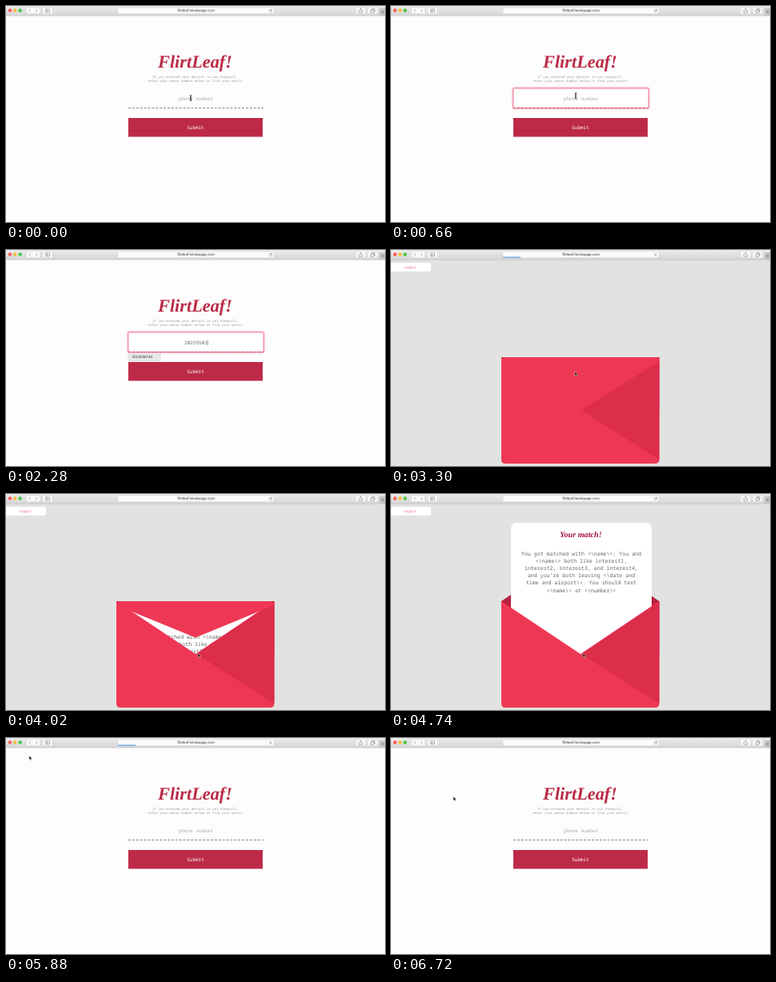
An HTML page for the animation above (6.78 s loop, 474 px wide and 270 px high).

```html
<!DOCTYPE html>
<html lang="en">
<head>
<meta charset="utf-8">
<title>Match finder</title>
<style>
  html, body { margin: 0; width: 100%; height: 100%; overflow: hidden; background: #fdfdfd; }
  svg { display: block; width: 100vw; height: 100vh; }
  text { text-anchor: middle; text-rendering: geometricPrecision; white-space: pre; }
  .mono { font-family: "Noto Sans Mono", "DejaVu Sans Mono", monospace; }
  .sans { font-family: Roboto, "Open Sans", sans-serif; }
  .script { font: italic bold 22.3px "Liberation Serif", "Noto Serif", serif; }
  .icon { fill: none; stroke: #777; stroke-width: .6; }
  .button { fill: #fbfbfb; stroke: #d0d0d0; stroke-width: .4; }
</style>
</head>
<body>
<svg viewBox="0 0 474 270">
  <defs>
    <linearGradient id="chrome" x2="0" y2="1">
      <stop stop-color="#ebebeb"/><stop offset="1" stop-color="#d6d6d6"/>
    </linearGradient>
    <clipPath id="inside"><path d="M0 0H474V262H0Z"/></clipPath>
    <filter id="glow" x="-10%" y="-30%" width="120%" height="160%"><feGaussianBlur stdDeviation=".8"/></filter>
  </defs>

  <g id="form">
    <rect width="474" height="270" fill="#fdfdfd"/>
    <text class="script" x="236.5" y="76.5" fill="#b92a46">FlirtLeaf!</text>
    <g class="mono" font-size="4.05" fill="#999">
      <text x="236.5" y="90">If you entered your details in our Askquill,</text>
      <text x="237" y="95">enter your phone number below to find your match!</text>
    </g>
    <g id="focus">
      <rect x="153" y="103" width="169" height="24.5" rx="1" fill="none" stroke="#ee6480" stroke-width="1.6" filter="url(#glow)"/>
      <rect x="153" y="103" width="169" height="24.5" rx="1" fill="#fff" stroke="#e8788e" stroke-width=".8"/>
    </g>
    <path id="dashes" d="M153 127.5H322" stroke-width="1.1" stroke-dasharray="3 1.9"/>
    <text id="field" class="mono" x="237.5" y="118" font-size="6"/>
    <path id="caret" stroke="#555" stroke-width=".6"/>
    <rect x="153" y="140" width="168" height="23.5" fill="#bd2a47"/>
    <text class="mono" x="237" y="154" font-size="6" fill="#fff">Submit</text>
    <g id="suggest">
      <rect x="153" y="129" width="40" height="9.5" rx="1" fill="#e9e9e9" stroke="#ccc" stroke-width=".5"/>
      <text id="full" class="sans" x="170.5" y="135.2" font-size="4.5" fill="#333"/>
    </g>
  </g>

  <g id="card">
    <rect width="474" height="270" fill="#e2e2e2"/>
    <rect x="-4" y="16" width="54" height="10.7" rx="3" fill="#fff"/>
    <text class="mono" x="24" y="23" font-size="4.3" fill="#e8647c">Logout</text>
    <path id="flapUp" fill="#b9223f"/>
    <path d="M138 134H335.5V200H138Z" fill="#b9223f"/>
    <g clip-path="url(#inside)">
      <g id="letter">
        <rect x="150" y="36" width="176" height="166" rx="7" fill="#fff"/>
        <text class="script" x="237.5" y="54" style="font-size:10.2px" fill="#a5143a">Your match!</text>
        <g id="message" class="mono" font-size="6.58" fill="#666"/>
      </g>
    </g>
    <path d="M138 134L237 200L335.5 134V262Q335.5 267 330 267H143Q138 267 138 262Z" fill="#ee3754"/>
    <path d="M335.5 134L238 200L335.5 262Z" fill="#dc2d4b"/>
    <path id="flapDown" fill="#ee3754"/>
  </g>

  <g id="browser">
    <rect width="474" height="12" fill="url(#chrome)"/>
    <path d="M0 12.2H474" stroke="#b9b9b9" stroke-width=".6"/>
    <circle cx="5" cy="5.5" r="2.2" fill="#f95f57"/>
    <circle cx="11.3" cy="5.5" r="2.2" fill="#f8bd3a"/>
    <circle cx="17.6" cy="5.5" r="2.2" fill="#44c644"/>
    <g class="button">
      <rect x="25.5" y="2" width="17" height="7.6" rx="1"/>
      <rect x="46" y="2" width="12" height="7.6" rx="1"/>
      <rect x="140" y="2" width="195" height="7.6" rx="1"/>
      <rect x="437.5" y="2" width="12" height="7.6" rx="1"/>
      <rect x="452.5" y="2" width="12" height="7.6" rx="1"/>
    </g>
    <rect x="467" y="3" width="7" height="9" fill="#c4c4c4"/>
    <path class="icon" d="M30.5 4L29 5.8L30.5 7.6M37.5 4L39 5.8L37.5 7.6M49.5 4H54.5V7.6H49.5ZM51.2 4V7.6M442 5H441.3V8.2H445.7V5H445M443.5 6.5V3M442.5 4L443.5 3L444.5 4M456 5H460V8.2H456ZM457.5 5V3.6H461.2V7H460M469 7.5H473M471 5.5V9.5"/>
    <path id="reload" class="icon" d="M332.3 5A1.6 1.6 0 1 0 332.6 6.3M332.5 3.8V5.2H331.1"/>
    <path id="stop" class="icon" d="M329.4 4.4L332.4 7.4M332.4 4.4L329.4 7.4"/>
    <text class="sans" x="237.5" y="7.4" font-size="4.5" fill="#333">flirtleaf.herokuapp.com</text>
    <rect id="progress" x="140" y="8.6" height="1" fill="#3f8fe0"/>
  </g>

  <path id="beam" d="M-1.2 -3.5Q0 -3.5 0 -2.5V2.5Q0 3.5 -1.2 3.5M1.2 -3.5Q0 -3.5 0 -2.5V2.5Q0 3.5 1.2 3.5" fill="none" stroke="#222" stroke-width=".8"/>
  <path id="arrow" d="M0 -1V4.2L1.2 3.2L2.1 5.1L3 4.6L2.2 2.9H3.7Z" fill="#111" stroke="#fff" stroke-width=".4"/>
</svg>
<script>
const LOOP = 6780, NUMBER = "2025550143";
const SUBMIT = 3060, LOGOUT = 5700, TYPE = 1080, KEY = 160;
const $ = id => document.getElementById(id);
const set = (id, name, value) => $(id).setAttribute(name, value);
const show = (id, on) => set(id, "visibility", on ? "inherit" : "hidden");
const ramp = (t, a, b) => Math.min(1, Math.max(0, (t - a) / (b - a)));
const ease = p => p * p * (3 - 2 * p);

// time, x, y
const path = [
  [0, 231, 115], [400, 231, 115], [600, 231, 112], [2640, 231, 112],
  [2880, 230, 153], [3480, 230, 153], [3840, 240, 200], [4800, 240, 200],
  [5400, 29, 23], [5880, 29, 23], [6480, 78, 74], [LOOP, 78, 74]
];

const lines = [
  "You got matched with <\\name\\>; You and",
  "<\\name\\> both like interest1,",
  "interest2, interest3, and interest4,",
  "and you're both leaving <\\date and",
  "time and airport\\>. You should text",
  "<\\name\\> at <\\number\\>"
];
lines.forEach((line, i) => {
  const text = document.createElementNS("http://www.w3.org/2000/svg", "text");
  text.textContent = line;
  text.setAttribute("x", 238);
  text.setAttribute("y", 77 + i * 9.1);
  $("message").append(text);
});
$("full").textContent = NUMBER;

function drawForm(t) {
  const focused = t >= 360 && t < SUBMIT;
  const count = focused ? Math.min(10, Math.max(0, Math.floor((t - TYPE) / KEY) + 1)) : 0;
  show("focus", focused);
  set("dashes", "stroke", focused ? "#d2405c" : "#8f7f88");
  $("field").textContent = count ? NUMBER.slice(0, count) : "phone number";
  set("field", "fill", count ? "#666" : "#aaa");
  show("caret", count > 0 && t < 2760);
  set("caret", "d", `M${237.8 + count * 1.8} 112.5V119`);
  show("suggest", count > 0 && t < 2640);
}

function drawCard(t) {
  const fold = Math.cos(Math.PI * ease(ramp(t, 3900, 4260)));
  const flap = `M138 134L237 ${134 + 67 * fold}L335.5 134Z`;
  set("flapUp", "d", flap);
  set("flapDown", "d", `M138 139Q138 134 143 134H330.5Q335.5 134 335.5 139L237 ${134 + 67 * fold}Z`);
  show("flapUp", fold < 0);
  show("flapDown", fold >= 0);
  const rise = ease(ramp(t, 4200, 4620));
  set("letter", "transform", `translate(0 ${104 * (1 - rise)})`);
}

function drawBrowser(t) {
  const start = t < 4500 ? 3000 : LOGOUT - 60;
  const age = t - start;
  const loading = age >= 0 && age < 660;
  show("reload", !loading);
  show("stop", loading);
  show("progress", loading);
  set("progress", "width", 22 + 173 * ramp(age, 330, 600));
}

function drawPointer(t) {
  const i = Math.max(1, path.findIndex(p => p[0] > t));
  const [t0, x0, y0] = path[i - 1], [t1, x1, y1] = path[i];
  const p = ease(ramp(t, t0, t1));
  const move = `translate(${x0 + (x1 - x0) * p} ${y0 + (y1 - y0) * p})`;
  set("beam", "transform", move);
  set("arrow", "transform", move);
  show("beam", t < TYPE);
  show("arrow", t >= 2640);
}

function draw(now) {
  const t = now % LOOP;
  const matched = t >= SUBMIT && t < LOGOUT;
  set("form", "display", matched ? "none" : "inline");
  set("card", "display", matched ? "inline" : "none");
  drawForm(t);
  drawCard(t);
  drawBrowser(t);
  drawPointer(t);
}

const begin = performance.now();
function tick() {
  draw(performance.now() - begin);
  requestAnimationFrame(tick);
}
tick();
</script>
</body>
</html>
```
